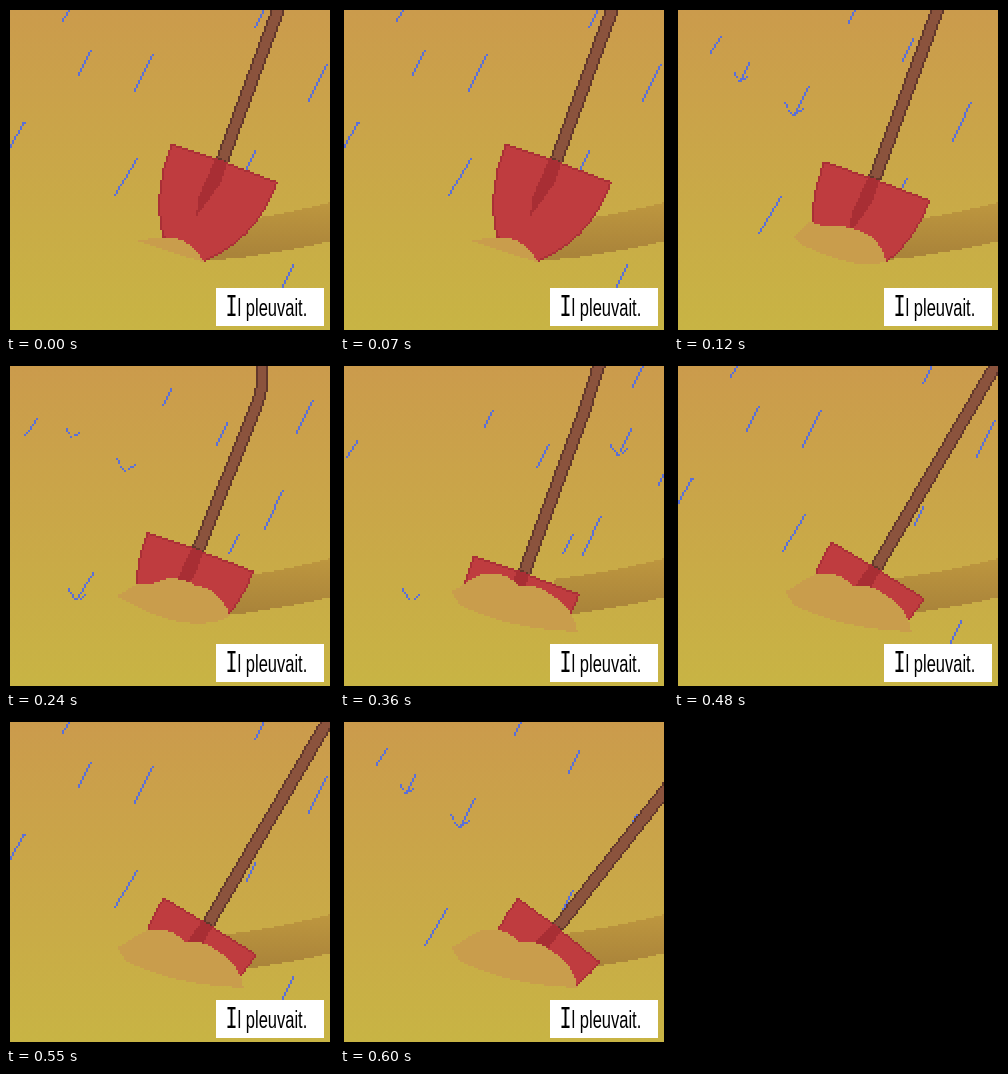
Animation, 328 px wide and 328 px high, one loop 720 ms. Source, as an HTML page with a canvas:

```html
<!DOCTYPE html>
<html lang="fr">
<head>
<meta charset="utf-8">
<title>Il pleuvait.</title>
<style>
  html, body { margin: 0; width: 100%; height: 100%; overflow: hidden; background: #000; }
  canvas, svg { position: absolute; left: 0; top: 0; width: 100vw; height: 100vh; display: block; }
  canvas { image-rendering: pixelated; }
  text { font: 16.5px "Liberation Sans", Arial, sans-serif; }
  .initial { font: 20px "DejaVu Sans Mono", monospace; }
</style>
</head>
<body>
<canvas id="scene" width="164" height="164"></canvas>
<svg viewBox="0 0 328 328">
  <rect x="210" y="282" width="108" height="38" fill="#fff"/>
  <text transform="translate(219.5 309.5) scale(1 1.45)"><tspan class="initial">I</tspan>l pleuvait.</text>
</svg>
<script>
const CELL = 2, SIZE = 164, STEP = 120, RAIN_STEPS = 4;
const RAIN = "#5b6fd8", SAND = "#c99d4c";

const ctx = document.getElementById("scene").getContext("2d");
const stencil = document.createElement("canvas");
stencil.width = stencil.height = SIZE;
const pen = stencil.getContext("2d", { willReadFrequently: true });
pen.lineWidth = 13;

// Blade and crease are relative to the foot of the handle.
const blade = new Path2D("M-51-18L-4-2L56 21Q35 79-18 101L-60 76Q-70 31-51-18Z");
const crease = new Path2D("M-7-1L5 2L-2 23L-26 56L-23 35Z");
const shadow = new Path2D("M330 195Q270 211 215 217L198 255Q250 252 330 234Z");

// The rim of a heap also cuts off the buried part of the blade.
const heaps = {
  small: { rim: "M130 234L165 231Q186 234 198 256", base: "Q168 248 130 234Z" },
  rising: { rim: "M120 231L135 215Q152 223 165 220Q206 224 212 256", base: "Q180 264 128 239Z" },
  wide: { rim: "M110 234L132 222Q145 223 160 217Q178 215 190 224Q214 226 224 254", base: "Q185 274 125 242Z" },
  full: { rim: "M111 230L137 214Q165 206 179 225Q197 221 210 232Q232 244 238 270", base: "Q165 266 120 243Z" }
};

const poses = [
  { heap: heaps.small, shaft: "M273.5 0", foot: [216, 155] },
  { heap: heaps.rising, shaft: "M265 0", foot: [200.5, 173] },
  { heap: heaps.wide, shaft: "M256 0V24Q254 36 248 50", foot: [192, 188] },
  { heap: heaps.full, shaft: "M260 0L244 50", foot: [184, 211] },
  { heap: heaps.full, shaft: "M326-4", foot: [202, 206], turn: 11.5, scale: .965 },
  { heap: heaps.full, shaft: "M332 64", foot: [217.5, 209.5], turn: 18, scale: .92 }
];

// "at" is the lower end of a streak when it appears, "land" the point where it splashes.
const drops = [
  { at: [303, 95], size: [18, 37] },
  { at: [249, 21], size: [11, 21] },
  { at: [56, 15], size: [11, 16] },
  { at: [4, 141], size: [15, 25], last: 0 },
  { at: [275, 282], size: [12, 24], last: 0 },
  { at: [240, 163], size: [9, 18], stop: 27 },
  { at: [128, 85], size: [19, 37], last: 1, land: [120, 108] },
  { at: [72, 68], size: [12, 24], last: 1, land: [66, 74] },
  { at: [109, 188], size: [22, 35], last: 2, land: [71, 237] },
  { at: [174, 17], size: [8, 16], first: 1 },
  { at: [291, 71], size: [16, 33], first: 2, land: [279, 92] },
  { at: [292, 25], size: [10, 20], first: 3 },
  { at: [318, 123], size: [8, 15], first: 3 }
];

function gradient(y1, y2, from, to) {
  const g = ctx.createLinearGradient(0, y1 / CELL, 0, y2 / CELL);
  g.addColorStop(0, from);
  g.addColorStop(1, to);
  return g;
}
const ground = gradient(4, 324, "#cb9b4c", "#c8b444");
const shade = gradient(198, 248, "#bd963f", "#aa843a");

// Paints a path in whole cells, with an optional darker edge and clipping path.
function paint(path, color, { edge, clip, method = "fill" } = {}) {
  const mask = (shape, how) => {
    pen.setTransform(1 / CELL, 0, 0, 1 / CELL, 0, 0);
    pen.clearRect(0, 0, SIZE * CELL, SIZE * CELL);
    pen[how](shape);
    const { data } = pen.getImageData(0, 0, SIZE, SIZE);
    return (x, y) => x < 0 || y < 0 || x >= SIZE || y >= SIZE || data[(y * SIZE + x) * 4 + 3] > 127;
  };
  const inside = mask(path, method);
  const visible = clip ? mask(clip, "fill") : () => true;
  for (let y = 0; y < SIZE; y++) {
    for (let x = 0; x < SIZE; x++) {
      if (!inside(x, y) || !visible(x, y)) continue;
      const inner = inside(x - 1, y) && inside(x + 1, y) && inside(x, y - 1) && inside(x, y + 1);
      ctx.fillStyle = edge && !inner ? edge : color;
      ctx.fillRect(x, y, 1, 1);
    }
  }
}

function line(x1, y1, x2, y2) {
  const n = Math.max(1, Math.round(Math.max(Math.abs(x2 - x1), Math.abs(y2 - y1)) / CELL));
  ctx.fillStyle = RAIN;
  for (let i = 0; i <= n; i++) {
    const x = x1 + (x2 - x1) * i / n, y = y1 + (y2 - y1) * i / n;
    ctx.fillRect(Math.floor(x / CELL), Math.floor(y / CELL), 1, 1);
  }
}

function splash(x, y, r) {
  line(x - r, y - r * 1.2, x - r * .7, y - r * .7);
  line(x - r * .5, y - r * .4, x - r * .2, y);
  line(x + r * .4, y - r * .1, x + r, y - r * .5);
}

// Drops slow down as they fall; long streaks are nearer and move faster.
const fall = (step, height) => (38 * step - 3 * step * step) * (.75 + height / 100);

function drawDrop({ at: [x, y], size: [w, h], first = 0, last = 3, stop = Infinity, land }, step) {
  if (land && (step === last || step === last + 1)) {
    if (step === last) line(...land, land[0] + w * .75, land[1] - h * .75);
    splash(...land, h / 4);
  } else if (step >= first && step <= last) {
    const d = Math.min(stop, fall(step, h) - fall(first, h));
    line(x - d * .62, y + d, x - d * .62 + w, y + d - h);
  }
}

function drawShovel({ heap: { rim, base }, shaft, foot, turn = 0, scale = 1 }) {
  const matrix = new DOMMatrix().translate(...foot).rotate(turn).scale(scale);
  const place = path => {
    const placed = new Path2D();
    placed.addPath(path, matrix);
    return placed;
  };
  const clip = new Path2D(rim + "H328V0H0Z");

  paint(new Path2D(`${shaft}L${foot}`), "#8b533d", { edge: "#61372b", method: "stroke" });
  paint(new Path2D(rim + base), SAND);
  paint(place(blade), "#bf3c3f", { edge: "#a92f36", clip });
  paint(place(crease), "#a82e34", { clip });
}

function draw(step) {
  ctx.fillStyle = ground;
  ctx.fillRect(0, 0, SIZE, SIZE);
  paint(shadow, shade);
  drops.forEach(drop => drawDrop(drop, step % RAIN_STEPS));
  drawShovel(poses[step]);
  ctx.strokeStyle = "#000";
  ctx.lineWidth = 2;
  ctx.strokeRect(1, 1, SIZE - 2, SIZE - 2);
}

const start = performance.now();
let shown = -1;
function tick() {
  const step = Math.floor((performance.now() - start) / STEP) % poses.length;
  if (step !== shown) draw(shown = step);
  requestAnimationFrame(tick);
}
tick();
</script>
</body>
</html>
```
